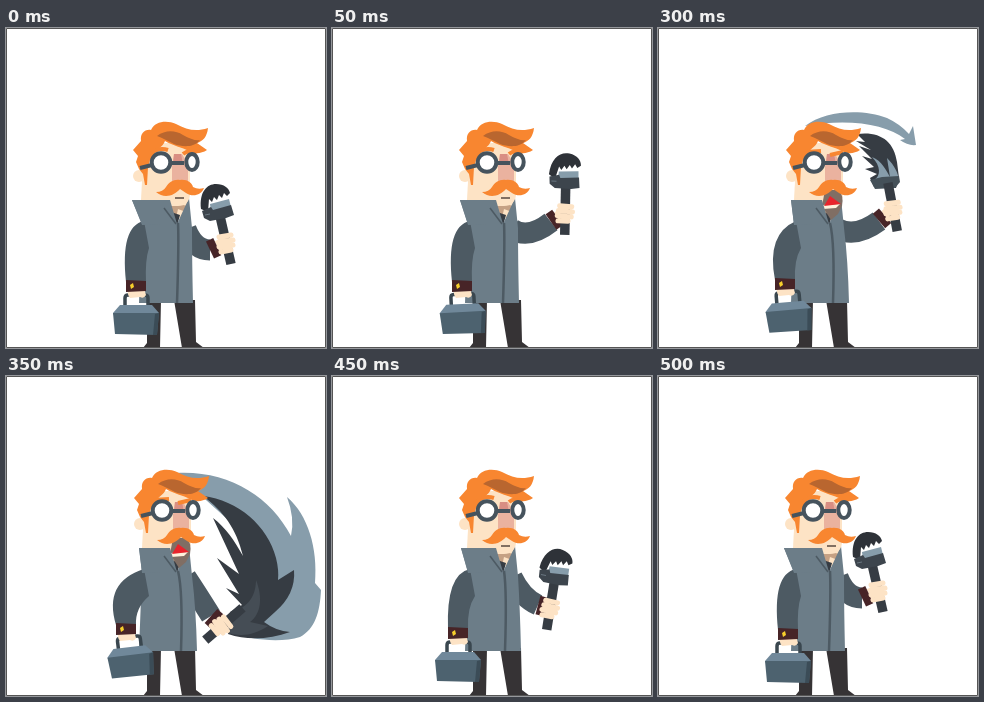
Write an HTML page with a canvas that moves like this. It is 320 px wide and 320 px high and loops after 1.5 s.

```html
<!DOCTYPE html>
<html>
<head>
<meta charset="utf-8">
<style>
html, body { margin: 0; height: 100%; overflow: hidden; background: #fff; }
canvas { display: block; width: 100vw; height: 100vh; }
</style>
</head>
<body>
<canvas id="stage" width="320" height="320"></canvas>
<script>
const ctx = document.getElementById('stage').getContext('2d');
const COAT = '#6c7d88', SHADE = '#4d5a63', DARK = '#363c43', STEEL = '#879dab',
  SKIN = '#fde3c5', HAIR = '#f88630', BROWN = '#b9662f', FRAME = '#46535d', CUFF = '#472427';

const fill = (color, d) => { ctx.fillStyle = color; ctx.fill(new Path2D(d)); };
const line = (color, width, d, cap = 'butt') => {
  ctx.strokeStyle = color;
  ctx.lineWidth = width;
  ctx.lineCap = cap;
  ctx.lineJoin = 'round';
  ctx.stroke(new Path2D(d));
};
const ring = (x, y, rx, ry) => {
  ctx.beginPath();
  ctx.ellipse(x, y, rx, ry, 0, 0, 7);
  ctx.fillStyle = '#fff';
  ctx.fill();
  ctx.strokeStyle = FRAME;
  ctx.lineWidth = 4;
  ctx.stroke();
};
// Moves a part from its drawn pivot to a new place, turned by deg.
const place = (px, py, x, y, deg, draw) => {
  ctx.save();
  ctx.translate(x, y);
  ctx.rotate(deg * Math.PI / 180);
  ctx.translate(-px, -py);
  draw();
  ctx.restore();
};

const swipes = {
  over() {
    fill(STEEL, 'M147 98C168 82 205 81 229 90Q242 96 251 106L255 98L258 117Q250 118 242 112L247 111C228 96 190 90 147 98Z');
    fill(DARK, 'M199 106C222 103 236 113 239 134L241 150L238 160L216 159L212 150L219 146L207 141L216 139L204 128L214 131L201 118L213 122L198 113L207 114Z');
    fill(STEEL, 'M214 129C224 133 228 142 232 149L229 130C237 138 240 145 241 152L216 152C223 148 223 138 214 129Z');
    fill('#455159', 'M212 152L224 149L241 148L242 154L237 160L217 161Z');
  },
  down() {
    fill(STEEL, 'M170 97C222 94 264 120 285 160Q289 142 281 121C302 139 312 172 309 207L315 214C314 236 309 253 294 261C274 267 245 264 222 256L250 220L240 160Z');
    fill(DARK, 'M197 120C232 124 262 150 270 182Q273 194 272 204L288 194Q290 218 269 236L258 246Q270 255 284 256C264 263 242 265 222 258L224 236L236 229L220 212L233 218L211 182L233 198L207 142C220 152 228 164 237 180C230 152 218 136 197 120Z');
    fill('#454d55', 'M224 237C242 232 250 220 250 204C257 222 255 238 244 246L262 250C248 259 236 261 222 257Z');
  },
  after() {
    fill(STEEL, 'M256 132C282 148 302 190 297 223L301 226L289 242Q284 237 283 226L289 229C293 195 280 160 256 132Z');
    fill(DARK, 'M243 142C260 158 265 174 266 194L272 184C278 194 280 211 275 221L269 231L262 229L255 241L234 246L228 231L231 220L237 219L234 210L242 214L249 203L250 212C261 193 259 168 243 142Z');
    fill('#566b79', 'M237 233C251 232 261 218 267 203C268 218 263 227 256 231L248 235L237 243Z');
    fill('#455159', 'M228 228L235 220L249 226L252 238L240 246L233 244Z');
  }
};

function wrench(head) {
  line(DARK, 9.5, 'M214 188L225 236');
  if (!head) return;
  fill('#2e3238', 'M195 181C193 164 201 156 210 156C218 156 223 160 224 165L221 168L218 165L216 170L213 167L211 172L208 169L206 174L203 171L202 184Z');
  fill(STEEL, 'M204 176L223 171L225 179L205 184Z');
  fill('#3d454d', 'M196 183L205 179L207 182L225 177L228 187L220 190L204 193L198 190Z');
  line('#697680', 1, 'M199 187L204 186');
}

function rightArm(p) {
  const [x, y] = p.hand;
  if (p.behind) {
    place(208, 165, 124, 187, -35, () => {
      fill(DARK, 'M195 177C193 162 202 155 211 156L222 161L220 165L224 168L219 169L222 173L217 173L219 178L214 177L214 184L204 187Z');
    });
    fill(SHADE, 'M176 170L189 163C196 168 201 177 203 182Q204 186 200 188L183 201Z');
    return;
  }
  if (p.swipe) swipes[p.swipe]();
  const [wx, wy] = p.wrist, a = Math.atan2(y - wy, x - wx);
  const cx = wx + 8 * Math.cos(a), cy = wy + 8 * Math.sin(a);
  line(SHADE, 21, `M180 201Q${p.elbow} ${wx} ${wy}`);
  line(SKIN, 12, `M${cx} ${cy}L${x} ${y}`);
  line(CUFF, 19, `M${wx} ${wy}L${cx} ${cy}`);
  place(219, 215, x, y, p.turn, () => {
    wrench(!p.swipe);
    line(SKIN, 5, 'M213 209L225 207M213 214L227 212M213 219L227 217M215 224L225 222', 'round');
  });
}

function body(p) {
  const { collar, hem } = p;
  fill('#363335', 'M141 272H155L154 320H137L141 315ZM168 272H189L190 314L198 320H176Z');
  rightArm(p);
  fill(SKIN, 'M162 160H184L182 184L168 194Z');
  fill('#c5a184', 'M162 174L182 178L180 184L172 181L169 195Z');
  fill(DARK, 'M165 184L174 187L171 198Z');
  fill(COAT, `M${collar} 172L160 173L171 196L183 170L186 200Q${hem - 1} 232 ${hem} 275H133L136 196Z`);
  line(SHADE, 2.5, `M172 195Q${hem - 14} 215 ${hem - 16} 275`);
}

function leftArm(p) {
  const [x, y] = p.cuff;
  place(130, 291, ...p.box, () => {
    line('#3a474f', 3.5, 'M119 280V270Q119 267 122 267H139Q142 267 142 270V280');
    fill('#70889a', 'M107 285L114 277H146L153 285L151 290H109Z');
    fill('#4d626f', 'M107 285L153 285L151 307L109 306Z');
    fill('#3b4c57', 'M149 286L153 285L151 307L147 307Z');
  });
  place(130, 258, x, y, p.cuffTurn, () => {
    fill(SKIN, 'M122 260H138L140 267Q138 271 134 269L124 270Q121 267 122 260Z');
  });
  fill(SHADE, `M138 193Q${p.joint} ${x - 10} ${y - 4}H${x + 10}Q${x + 9} 232 143 220Z`);
  place(130, 258, x, y, p.cuffTurn, () => {
    fill(CUFF, 'M120 252L140 253V263L120 264Z');
    fill('#f8cf2c', 'M124 257L127 255L128 259L125 261Z');
  });
}

function head(p) {
  place(155, 135, ...p.head, () => {
    fill(SKIN, 'M138 116L184 114V166Q183 178 172 178H159L135 172Z');
    ctx.beginPath();
    ctx.arc(133, 148, 6, 0, 7);
    ctx.fill();
    fill(HAIR, 'M139 157L137 146L133 141L130 134L132 128L127 122L135 113C134 105 139 101 145 102C149 93 161 92 170 96C181 102 190 104 202 100C201 109 197 113 191 115L201 122C195 126 188 126 183 123C176 119 167 118 159 113C157 119 150 121 148 127L144 132L142 139L141 157Z');
    fill(BROWN, 'M151 108C159 102 169 102 177 107C184 111 190 113 194 112C188 120 176 119 168 116C162 113 157 110 151 108Z');
    fill('#eab29f', 'M168 126H176L182 136V154H166V138Z');
    fill('#d98e83', 'M168 126H175L177 136H167Z');
    if (p.shout) {
      line(HAIR, 4, 'M146 124L162 123M171 127L184 124');
    } else {
      line(HAIR, 4, 'M145 125Q153 119 162 122M177 126Q183 121 190 126');
    }
    line(FRAME, 4, 'M134 140L146 137M164 135H178');
    ring(155, 134.5, 9.3, 9.3);
    ring(186, 134, 5.7, 8);
    if (p.shout) {
      fill('#806e64', 'M166 162H180Q185 168 183 178L179 186L172 192L163 178Z');
      fill('#fff1dc', 'M164 181L164 177L181 176L177 180Z');
      fill('#e8242c', 'M165 178L171 168L182 176Z');
    } else {
      line('#584841', 1.5, 'M169 170H178');
    }
    fill(HAIR, 'M174 152C181 151 186 155 187 159Q192 162 198 160C195 168 186 169 180 165L174 161C168 168 158 171 150 164Q157 164 160 159C163 154 168 151 174 152Z');
  });
}

const idle = {
  head: [155, 135, 0], collar: 126, hem: 187, elbow: '188 222', wrist: [204, 222], hand: [219, 215], turn: 0,
  joint: '114 198', cuff: [130, 258], cuffTurn: 0, box: [130, 291, 0]
};
const strike = {
  ...idle, head: [156, 135, 0], collar: 133, hem: 191, shout: true, elbow: '190 216', wrist: [205, 240],
  hand: [215, 249], turn: 68, joint: '112 200', cuff: [122, 256], box: [120, 288, 0]
};
// Each pose holds until the next start time.
const poses = [
  [0, idle],
  [50, { ...idle, collar: 128, elbow: '196 212', wrist: [219, 194], hand: [232, 185], turn: 14, box: [131, 290, -3] }],
  [100, {
    ...idle, head: [150.5, 134, -3], collar: 130, hem: 194, behind: true, joint: '112 215',
    cuff: [147, 256], cuffTurn: -10, box: [162, 284, -27]
  }],
  [300, {
    ...strike, swipe: 'over', elbow: '198 210', wrist: [221, 193], hand: [234, 182], turn: 2,
    joint: '108 206', cuff: [127, 256], box: [131, 288, -5]
  }],
  [350, { ...strike, swipe: 'down', turn: 62, joint: '97 206', cuff: [120, 253], box: [125, 285, -7] }],
  [400, { ...strike, swipe: 'after' }],
  [450, {
    ...idle, collar: 129, hem: 189, elbow: '190 222', wrist: [206, 229], hand: [217, 232], turn: 22,
    cuff: [126, 257], box: [126, 290, 0]
  }],
  [500, idle]
];

function draw(now) {
  const p = poses.filter(([start]) => start <= now % 1500).pop()[1];
  ctx.fillStyle = '#fff';
  ctx.fillRect(0, 0, 320, 320);
  body(p);
  leftArm(p);
  head(p);
  // Upright collar stands in front of the jaw.
  fill(COAT, `M${p.collar} 172L164 172L171 196L136 197Z`);
  line(SHADE, 1.5, 'M158 180L170 196');
  ctx.strokeStyle = '#555';
  ctx.lineWidth = 1;
  ctx.strokeRect(0.5, 0.5, 319, 319);
}

let begin;
function tick(now) {
  begin ??= now;
  draw(now - begin);
  requestAnimationFrame(tick);
}
draw(0);
requestAnimationFrame(tick);
</script>
</body>
</html>
```
